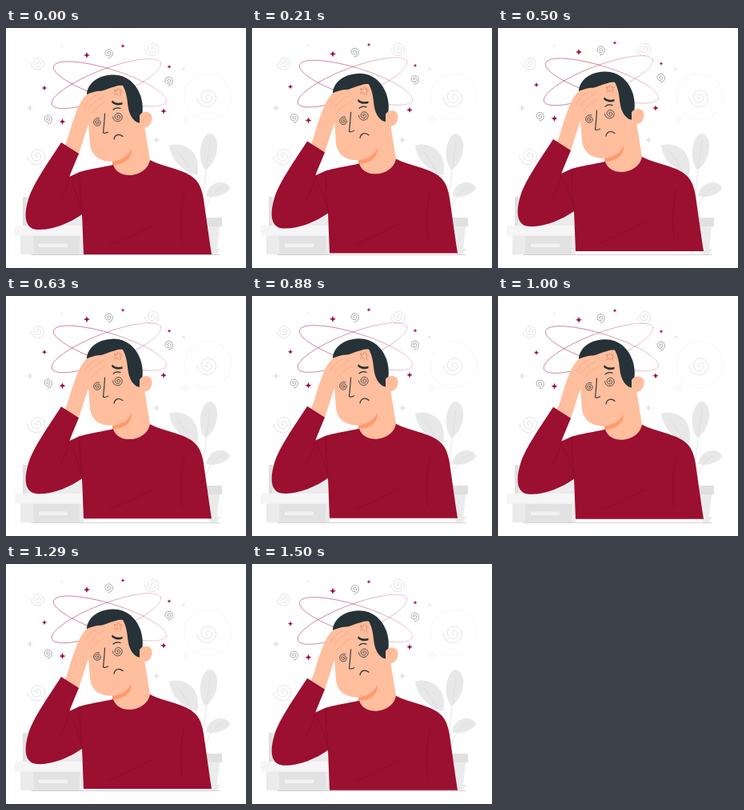
Recreate the animation shown at these times as an HTML page. Size 300 by 300 pixels, loop 1.54 s.

```html
<!DOCTYPE html>
<html lang="en">
<head>
<meta charset="utf-8">
<title>Dizzy man</title>
<style>
  html, body { margin: 0; width: 100%; height: 100%; overflow: hidden; background: #fff; }
  svg { display: block; width: 100vw; height: 100vh; }
  .line { fill: none; stroke-linecap: round; stroke-linejoin: round; }
  .red { fill: #9b0f30; }
  .skin { fill: #ffbe9d; }
  .dark { fill: #263238; }
  .ink { stroke: #263238; }
  .fold { stroke: #7a0c28; stroke-width: .5; }
  .crease { stroke: #f3a17b; stroke-width: .6; }
  .mark { stroke: #c77f5e; stroke-width: .7; }
  .ring { stroke: url(#fade); stroke-width: .6; }
</style>
</head>
<body>
<svg viewBox="0 0 300 300">
  <linearGradient id="fade">
    <stop offset=".35" stop-color="#9b0f30" stop-opacity=".75"/>
    <stop offset="1" stop-color="#9b0f30" stop-opacity=".3"/>
  </linearGradient>
  <g id="room">
    <path fill="#e0e0e0" d="M21 211H95V247H21Z"/>
    <path fill="#ebebeb" d="M25 211H95V247H25Z"/>
    <path fill="#ebebeb" d="M18 259H97V283H18Z"/>
    <path fill="#e2e2e2" d="M34 260H92V283H34Z"/>
    <path fill="#f2f2f2" d="M41 269.5H77V274H41Z"/>
    <path fill="#f5f5f5" d="M11 247H97V259.5H11Z"/>
    <path fill="#e8e8e8" d="M204 147C214 143 228 147 235 157C240 165 241 176 239 184C228 183 206 168 204 147Z"/>
    <path fill="#e8e8e8" d="M255 132C263 133 266 145 263 157C260 168 254 175 249 177C243 170 241 156 244 146C246 138 250 132 255 132Z"/>
    <path fill="#e8e8e8" d="M250 210C252 199 260 192 270 193C276 194 280 198 280 201C275 208 262 213 250 210Z"/>
    <path class="line" stroke="#dadada" stroke-width=".7" d="M214 154Q238 180 246 237M255 142Q250 180 246 210V237M271 199Q252 206 247 237"/>
    <path fill="#ebebeb" d="M238 248H267L264 276H268L263 283H256Z"/>
    <path fill="#e0e0e0" d="M235 237H270V248H235Z"/>
    <path class="line" stroke="#b4b4b4" stroke-width=".6" d="M32 283.5H267"/>
    <circle cx="252" cy="86" r="29" fill="none" stroke="#ececec" stroke-width=".8" stroke-dasharray="2 1.5"/>
  </g>
  <g id="man">
    <ellipse class="line ring" cx="125.5" cy="69.5" rx="73" ry="18" transform="rotate(-21 125.5 69.5)"/>
    <ellipse class="line ring" cx="130" cy="70" rx="74" ry="18" transform="rotate(17.5 130 70)"/>

    <path class="skin" d="M150 120L173 122L180 165L182 178Q156 196 133 176V164Z"/>
    <path class="skin" d="M104 82C116 70 146 64 154 80L172 110C171 125 166 141 158 151C151 161 140 168 127 166.500C114 165 107 158 105 146L103 118Z"/>
    <path fill="#ff9a6c" d="M133 167C145 165.500 153 159.500 157 151.500C158 162 148 171.500 133 171Z"/>
    <path class="dark" d="M101 82C102 71 113 59 133 58.500C151 58 163 70 168 84C171 93 172.500 104 168 118.500Q166 119 163 117.500C155 112 153 103 152 94C151 84 149 77 146 72C137 70 124 80 101 83Z"/>
    <path class="skin" d="M167 109C171 103 182 103 182.500 112C183 121 175 127 167 124Z"/>
    <path class="line crease" d="M171 115Q174 109 179 109"/>
    <path class="line mark" d="M135.500 77.500L138.500 78.500L140 75.500M142 76L142.500 78.500L145 78.500M145 80.500L142.500 81.500L143.500 84.500M141 84.500L139 82L136 84M135.500 82L137 80.500L135.500 77.500"/>

    <path class="dark" d="M133 90.500C136 94 141 94.500 145.500 93L145.500 95.500C140 97.500 134 96 132 92.500Z"/>
    <path class="line ink" stroke-width="1.200" d="M134 102Q138 98.500 143 100.500"/>
    <path class="line ink" stroke-width="1.100" d="M123.500 107Q123 118 121.500 131Q124 132 127.500 130"/>
    <path class="line ink" stroke-width="1.200" d="M135 139C136 133.500 141 131.500 146 135.500"/>
    <g id="eyes"></g>

    <path class="skin" d="M72 150C78 139 80 126 85 113C89 102 93 91 100 84C106 80 116 78 123 79Q126 81 122 85L126 89Q127 92 123 96C116 102 110 107 107 112C104 116 103 121 101 126L90 160Z"/>
    <path class="line crease" d="M98 98Q104 87 113 84M103 101Q110 91 122 86M107 107Q114 98 124 93"/>

    <path class="red" d="M69 143C55 165 34 194 28 214C22 234 23 251 39 252C58 253 79 244 95 233L97 283H257C254 264 250 235 247 214C244 195 238 187 222 180C208 174 190 171 180 165C176 187 140 191 134 171C120 174 101 177 92 180L79 186L91 157Z"/>
    <path class="line fold" d="M80 184Q76 202 68 216M92 181Q92 208 95.500 234M82 194Q90 210 94 226M129 272Q158 260 184 246M223 206Q216 232 220 268"/>
  </g>
</svg>
<script>
  const NS = "http://www.w3.org/2000/svg";
  const room = document.getElementById("room");
  const man = document.getElementById("man");
  const eyes = document.getElementById("eyes");

  function add(parent, attrs) {
    const path = document.createElementNS(NS, "path");
    for (const name in attrs) path.setAttribute(name, attrs[name]);
    parent.append(path);
  }

  function spiral(parent, x, y, r, turns, stroke, width, start = 0) {
    const n = turns * 16;
    let d = "";
    for (let i = 0; i <= n; i++) {
      const a = start + i / 16 * Math.PI * 2, q = r * i / n;
      d += (i ? "L" : "M") + (x + q * Math.cos(a)).toFixed(2) + " " + (y + q * Math.sin(a)).toFixed(2);
    }
    add(parent, { d, stroke, "stroke-width": width, class: "line" });
  }

  function star(parent, x, y, r, fill) {
    const k = r * 0.28;
    const d = `M${x} ${y - r}L${x + k} ${y - k}L${x + r} ${y}L${x + k} ${y + k}` +
      `L${x} ${y + r}L${x - k} ${y + k}L${x - r} ${y}L${x - k} ${y - k}Z`;
    add(parent, { d, fill });
  }

  for (const [x, y, r] of [[40, 44, 9], [183, 26, 9.5], [39, 160, 12], [252, 87, 13]])
    spiral(room, x, y, r, 2.5, "#dcdcdc", 0.8);
  spiral(room, 225, 114, 5, 2.5, "#f3f3f3", 0.8);
  for (const [x, y, r] of [[70, 22, 2], [30, 100, 4.5], [188, 140, 4.5], [222, 51, 2.5]])
    star(room, x, y, r, "#e4e4e4");

  for (const [x, y] of [[128, 31.5], [203, 66], [52, 114]])
    spiral(man, x, y, 6, 2.25, "#7d858a", 0.7);
  for (const [x, y, r] of [[101, 34, 4], [146, 22.5, 2.5], [48, 75, 3.2], [70.5, 117, 4], [197, 104, 3.7], [204, 48.5, 2.5]])
    star(man, x, y, r, "#9b0f30");

  spiral(eyes, 114.5, 118, 5.5, 2.5, "#263238", 0.8, 2);
  spiral(eyes, 140, 111, 6.5, 2.5, "#263238", 0.8);

  // Float up and back at constant speed, at 24 steps a second
  const LOOP = 1540, STEPS = 37, RISE = 6;
  const begin = performance.now();

  function draw() {
    const t = (performance.now() - begin) % LOOP;
    const step = Math.floor(t / LOOP * STEPS + 0.1);
    const y = -RISE * (1 - Math.abs(1 - 2 * step / STEPS));
    man.setAttribute("transform", `translate(0 ${y.toFixed(3)})`);
    requestAnimationFrame(draw);
  }
  draw();
</script>
</body>
</html>
```
